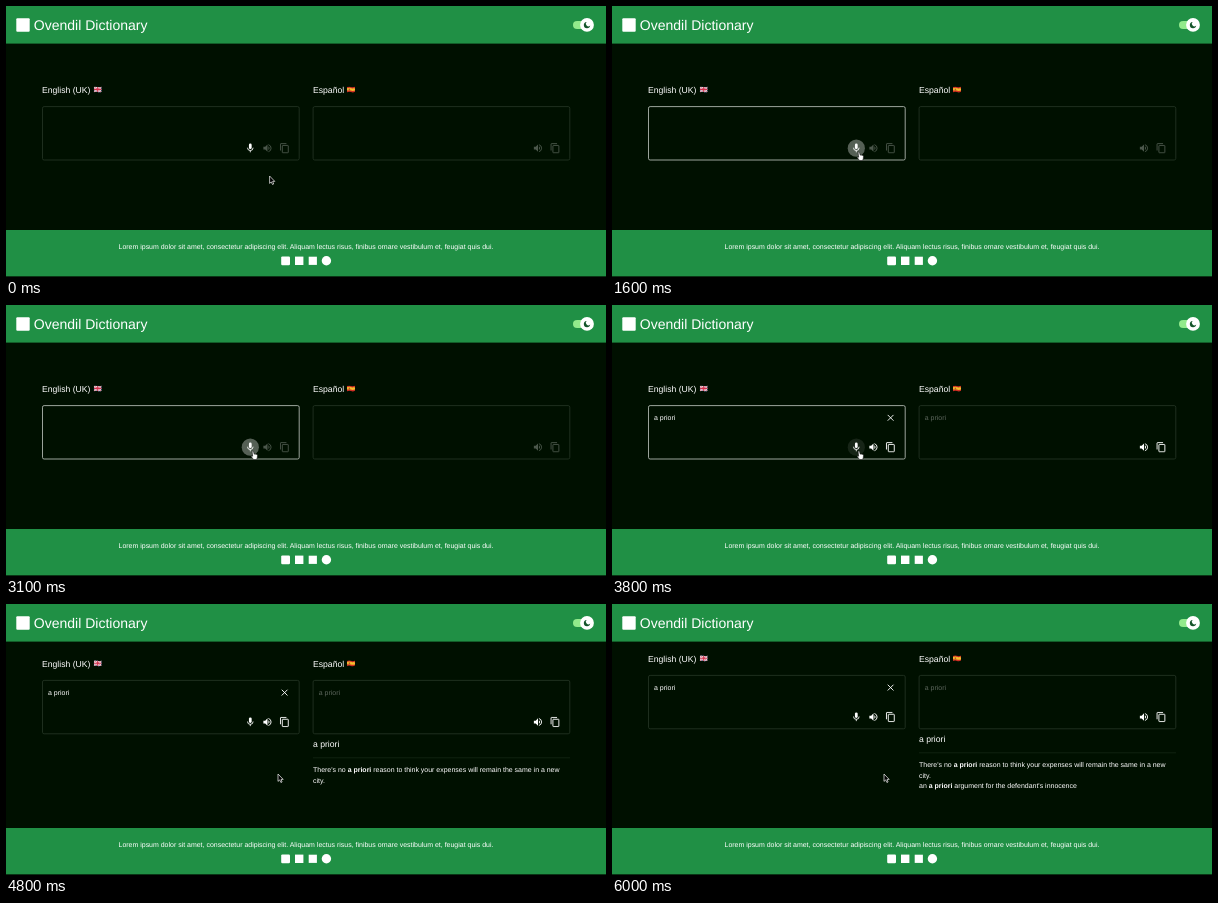
Animation of 600 by 271 pixels, one loop 6200 ms. Source, as an HTML page:

```html
<!DOCTYPE html>
<html lang="en">
<head>
<meta charset="utf-8">
<title>Ovendil Dictionary</title>
<style>
html, body { margin: 0; width: 100%; height: 100%; overflow: hidden; background: #001000; }
svg { display: block; width: 100vw; height: 100vh; }
text { font-family: "Liberation Sans", Arial, sans-serif; font-size: 6.98px; fill: #fff; text-rendering: geometricPrecision; }
.title { font-size: 14px; }
.label { font-size: 8.65px; }
.box { fill: none; stroke: #263626; stroke-width: .8; }
.dim { fill: #5c675c; }
b, .bold { font-weight: bold; }
</style>
</head>
<body>
<svg viewBox="0 0 600 271" preserveAspectRatio="none">
  <defs>
    <symbol id="mic" viewBox="0 0 24 24">
      <rect x="9" y="2" width="6" height="12" rx="3"/>
      <path d="M5.9 11a6.1 6.1 0 0 0 12.2 0M12 17v4" fill="none" stroke="currentColor" stroke-width="1.9"/>
    </symbol>
    <symbol id="sound" viewBox="0 0 24 24">
      <path d="M3 9v6h4l5 5V4L7 9zM14 8a4.5 4.5 0 0 1 0 8z"/>
      <path d="M14 4.3a8 8 0 0 1 0 15.4" fill="none" stroke="currentColor" stroke-width="2"/>
    </symbol>
    <symbol id="copy" viewBox="0 0 24 24">
      <g fill="none" stroke="currentColor" stroke-width="2">
        <path d="M3 17V3q0-1 1-1h12"/>
        <rect x="7" y="6" width="13" height="16" rx="1"/>
      </g>
    </symbol>
    <symbol id="close" viewBox="0 0 24 24">
      <path d="M5.7 5.7 18.3 18.3M18.3 5.7 5.7 18.3" stroke="currentColor" stroke-width="2"/>
    </symbol>
    <clipPath id="wave"><path d="M0 .7Q2 -.5 4 .5T8 .2V5.4Q6 6.6 4 5.7T0 5.9Z"/></clipPath>
  </defs>

  <rect width="600" height="271" fill="#001000"/>

  <g id="content">
    <text class="label" x="36" y="87">English (UK)</text>
    <g transform="translate(87.7 80.4)" clip-path="url(#wave)">
      <rect width="8" height="7" fill="#34468c"/>
      <path d="M0 0 8 6M8 0 0 6M4 0V7M0 3H8" stroke="#f4e8ea" stroke-width="1.9"/>
      <path d="M0 0 8 6M8 0 0 6" stroke="#d0405a" stroke-width=".6"/>
      <path d="M4 0V7M0 3H8" stroke="#d0304c" stroke-width="1.1"/>
    </g>
    <text class="label" x="307" y="87">Español</text>
    <g transform="translate(341 80.4)" clip-path="url(#wave)">
      <rect width="8" height="7" fill="#cf2f24"/>
      <path d="M0 3.2Q2 2.2 4 3T8 2.8" fill="none" stroke="#f5bd2c" stroke-width="2.6"/>
      <rect x="1.7" y="2.2" width="1.4" height="1.7" fill="#b5602a"/>
    </g>

    <g id="loader">
      <rect x="307" y="90.3" width="257" height="1.7" fill="#124a25"/>
      <rect id="bar" x="307" y="90.3" height="1.7" fill="#229047"/>
    </g>

    <rect id="field" class="box" x="36.5" y="100.6" width="256.7" height="53.4" rx="1.6"/>
    <rect class="box" x="307.1" y="100.6" width="256.7" height="53.4" rx="1.6"/>
    <circle id="halo" cx="244.3" cy="142.2" r="8.6" fill="#fff" fill-opacity=".09"/>
    <circle id="ripple" cx="244.3" cy="142.2" fill="#fff"/>
    <g id="icons"></g>

    <g id="word">
      <text x="42" y="115.2">a priori</text>
      <text class="dim" x="312.8" y="115.2">a priori</text>
      <use href="#close" x="273.1" y="107.3" width="11" height="11" color="#fff"/>
    </g>

    <g id="result">
      <text class="label" x="307" y="167.2">a priori</text>
      <path d="M307 178H564" stroke="#172a18" stroke-width=".7"/>
      <text x="307" y="192.5">There's no <tspan class="bold">a priori</tspan> reason to think your expenses will remain the same in a new</text>
      <text x="307" y="202.9">city.</text>
      <text id="extra" x="307" y="213.3">an <tspan class="bold">a priori</tspan> argument for the defendant's innocence</text>
    </g>
  </g>

  <rect width="600" height="37.6" fill="#209045"/>
  <rect x="10.3" y="12.3" width="13.4" height="13.4" rx="1" fill="#fff"/>
  <text class="title" x="27.8" y="23.8">Ovendil Dictionary</text>
  <rect x="567" y="14.9" width="19" height="8.2" rx="4.1" fill="#92ea8c"/>
  <circle cx="581" cy="18.9" r="6.9" fill="#fff"/>
  <path d="M580.6 15.9A3.2 3.2 0 1 0 584.2 19.5A2.4 2.4 0 0 1 580.6 15.9Z" fill="#14552a"/>

  <rect y="224" width="600" height="46.3" fill="#209045"/>
  <text x="300" y="242.6" text-anchor="middle">Lorem ipsum dolor sit amet, consectetur adipiscing elit. Aliquam lectus risus, finibus ornare vestibulum et, feugiat quis dui.</text>
  <g fill="#fff">
    <rect x="275.2" y="250.4" width="8.8" height="8.8" rx="1.2"/>
    <rect x="289" y="250.6" width="8.4" height="8.4"/>
    <rect x="302.7" y="250.7" width="8.2" height="8.2"/>
    <circle cx="320.4" cy="254.8" r="4.7"/>
  </g>

  <g id="arrow">
    <path d="M0 0V7.4L1.7 5.9 2.9 8.5 4.1 8 3 5.4H5.2Z" fill="#000" stroke="#e8e8e8" stroke-width=".75"/>
  </g>
  <g id="hand">
    <path d="M-.9 .2Q-.2 -.7 .5 .2L1.2 2.9Q2 2.3 2.5 2.9 3.2 2.6 3.6 3.3 4.4 3.2 4.5 4L4.3 6.2 3.6 8.2H.5L-1.6 5.4Q-2 4.4 -1.1 4.5L-.3 5Z" fill="#fff" stroke="#111" stroke-width=".55"/>
  </g>
</svg>
<script>
const LOOP = 6200;
const CLICK = 1200, HEARD = 3500, LOAD = 4530, FOUND = 4700, MORE = 4900;
const START = [263.6, 170], MIC = [247, 146.3], REST = [272, 170];
const $ = id => document.getElementById(id);
const clamp = x => Math.max(0, Math.min(1, x));
const span = (t, a, b) => clamp((t - a) / (b - a));
const ease = x => x * x * (3 - 2 * x);
const mix = (a, b, p) => a.map((v, i) => v + (b[i] - v) * p);
const show = (id, on) => $(id).setAttribute("visibility", on ? "visible" : "hidden");

const NS = "http://www.w3.org/2000/svg";
const icons = [["mic", 244.3], ["sound", 261.5], ["copy", 278.6], ["sound", 532], ["copy", 549.2]]
  .map(([name, x]) => {
    const el = document.createElementNS(NS, "use");
    const attrs = { href: "#" + name, x: x - 5.5, y: 136.7, width: 11, height: 11 };
    for (const k in attrs) el.setAttribute(k, attrs[k]);
    $("icons").append(el);
    return el;
  });

function pointer(t) {
  return t < 2000
    ? mix(START, MIC, ease(span(t, 100, 750)))
    : mix(MIC, REST, ease(span(t, 3850, 4400)));
}

function draw(t) {
  const [x, y] = pointer(t);
  const onMic = Math.hypot(x - 244.3, y - 142.2) < 8.6;
  const heard = t >= HEARD;

  $("content").setAttribute("transform", `translate(0 ${t < FOUND ? 0 : t < MORE ? -24.2 : -29.2})`);
  $("field").style.stroke = y < 154 ? "#c3cac3" : "";
  show("halo", onMic);
  $("ripple").setAttribute("r", 8.6 * ease(span(t, CLICK, CLICK + 400)));
  $("ripple").setAttribute("fill-opacity", .27 * (1 - span(t, HEARD, HEARD + 200)));

  icons.forEach((el, i) => {
    const tone = i === 0 || heard ? "#fff" : "#4b574b";
    el.setAttribute("fill", tone);
    el.setAttribute("color", tone);
  });

  show("word", heard);
  show("loader", t >= LOAD && t < FOUND);
  $("bar").setAttribute("width", Math.max(0, (t - LOAD) * 32 / 70));
  show("result", t >= FOUND);
  show("extra", t >= MORE);

  for (const id of ["arrow", "hand"]) $(id).setAttribute("transform", `translate(${x} ${y})`);
  show("arrow", !onMic);
  show("hand", onMic);
}

const begin = performance.now();
function tick() {
  draw((performance.now() - begin) % LOOP);
  requestAnimationFrame(tick);
}
tick();
</script>
</body>
</html>
```
